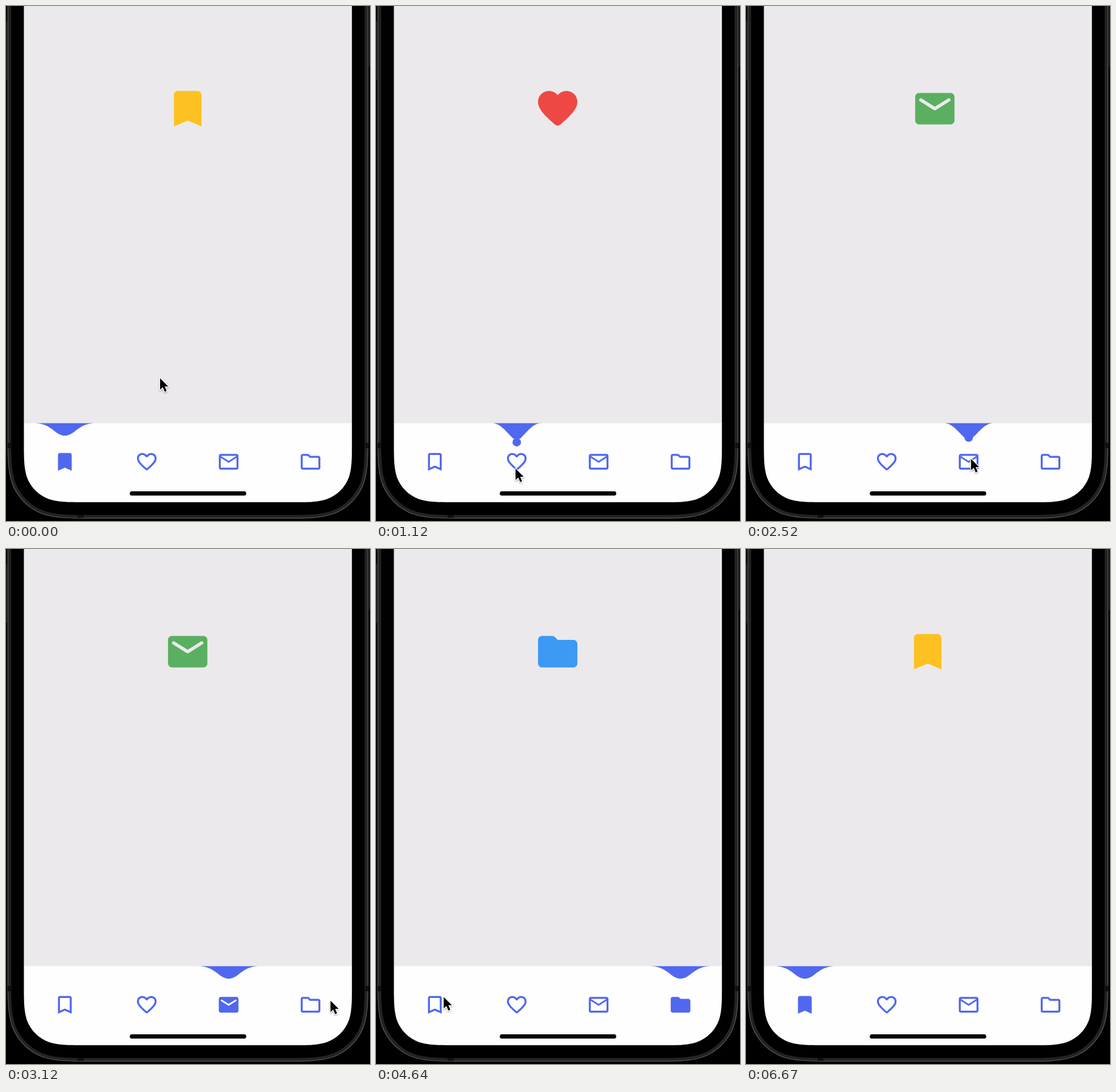
Animation, 600 px wide and 850 px high, one loop 6700 ms. Source, as an HTML page:

```html
<!DOCTYPE html>
<html lang="en">
<head>
<meta charset="utf-8">
<title>Water drop navigation bar</title>
<style>
html, body { margin: 0; width: 100%; height: 100%; overflow: hidden; background: #000; }
svg { display: block; width: 600px; height: 850px; }
</style>
</head>
<body>
<svg viewBox="0 0 600 850">
  <defs>
    <clipPath id="screen"><path id="screenShape"/></clipPath>
    <clipPath id="reveal"><circle id="revealCircle" cx="12" cy="12" r="0"/></clipPath>
    <filter id="shadow" x="-50%" y="-50%" width="200%" height="200%">
      <feDropShadow dx="0" dy="1.5" stdDeviation="1.3" flood-opacity=".4"/>
    </filter>
  </defs>

  <rect width="600" height="850"/>
  <path d="M0 25H2V122H0ZM598 0H600V100H598Z" fill="#1b1b1b"/>
  <g id="body"></g>
  <path d="M3 721H8V730H3ZM592 721H597V730H592ZM118 840H128V845H118Z" fill="#111"/>

  <g clip-path="url(#screen)">
    <rect x="29" width="542" height="689" fill="#ebe9ec"/>
    <g id="pages"></g>
    <rect x="29" y="688.5" width="542" height="131" fill="#fffeff"/>
    <g fill="#5068ef">
      <path id="wave"/>
      <circle id="drop" r="7"/>
      <g id="tabs" fill-rule="evenodd"></g>
    </g>
    <rect x="204" y="801" width="192" height="7" rx="3.5"/>
  </g>
  <path id="cursor" d="M0 0V23L5.4 18L9.4 27L13.2 25.4L9.4 16.6H16.4Z"
    stroke="#fff" stroke-width="3" stroke-linejoin="round" paint-order="stroke" filter="url(#shadow)"/>
</svg>

<script>
const LOOP = 6700, PAGE_WIDTH = 540, BAR_TOP = 688.5;

const bookmark = "M17 3H7c-1.1 0-2 .9-2 2v16l7-3 7 3V5c0-1.1-.9-2-2-2z";
const heart = "M13.35 20.13c-.76.69-1.93.69-2.69-.01l-.11-.1C5.3 15.27 1.87 12.16 2 8.28c.06-1.7.93-3.33 2.34-4.29 2.64-1.8 5.9-.96 7.66 1.1 1.76-2.06 5.02-2.91 7.66-1.1 1.41.96 2.28 2.59 2.34 4.29.14 3.88-3.3 6.99-8.55 11.76l-.1.09z";
const envelope = "M20 4H4c-1.1 0-2 .9-2 2v12c0 1.1.9 2 2 2h16c1.1 0 2-.9 2-2V6c0-1.1-.9-2-2-2z";
const folder = "M10.59 4.59C10.21 4.21 9.7 4 9.17 4H4c-1.1 0-2 .9-2 2v12c0 1.1.9 2 2 2h16c1.1 0 2-.9 2-2V8c0-1.1-.9-2-2-2h-8z";

const icons = [
  { color: "#fdc122", solid: bookmark, line: bookmark + "M17 18l-5-2.18L7 18V5h10z" },
  { color: "#ee4845", solid: heart,
    line: heart + "M12.1 18.55l-.1.1-.1-.1C7.14 14.24 4 11.39 4 8.5 4 6.5 5.5 5 7.5 5c1.54 0 3.04.99 3.57 2.36h1.87C13.46 5.99 14.96 5 16.5 5c2 0 3.5 1.5 3.5 3.5 0 2.89-3.14 5.74-7.9 10.05z" },
  { color: "#5aaf60",
    solid: envelope + "M19.6 8.25l-7.07 4.42c-.32.2-.74.2-1.06 0L4.4 8.25c-.25-.16-.4-.43-.4-.72 0-.67.73-1.07 1.3-.72L12 11l6.7-4.19c.57-.35 1.3.05 1.3.72 0 .29-.15.56-.4.72z",
    line: envelope + "M20 18H4V8l8 5 8-5zM12 11L4 6h16z" },
  { color: "#3c99f4", solid: folder, line: folder + "M4 18V6h5.17l2 2H20v10z" },
];

const taps = [
  { at: 715, from: 0, to: 1 },
  { at: 2180, from: 1, to: 2 },
  { at: 3520, from: 2, to: 3 },
  { at: 5080, from: 3, to: 0 },
];

// Pointer stops: time, x, y
const stops = [
  [0, 254, 613], [30, 254, 613], [320, 204, 715], [560, 229, 769], [715, 230, 762],
  [1480, 230, 762], [1980, 370, 744], [2150, 370, 742], [2500, 370, 746], [2980, 532, 744],
  [3160, 535, 744], [3420, 506, 746], [3520, 506, 746], [3900, 502, 762], [4220, 500, 762],
  [4640, 112, 738], [4780, 78, 742], [5000, 94, 745], [5160, 94, 745],
  [5450, 410, 738], [5580, 557, 738], [5680, 670, 738],
];

const $ = id => document.getElementById(id);
const clamp = v => Math.min(1, Math.max(0, v));
const ramp = (t, a, b) => clamp((t - a) / (b - a));
const lerp = (a, b, k) => a + (b - a) * k;
const smooth = k => k * k * (3 - 2 * k);
const tabX = i => 97 + 135 * i;
const show = (node, visible) => node.setAttribute("visibility", visible ? "visible" : "hidden");

function add(parent, attrs) {
  const path = document.createElementNS("http://www.w3.org/2000/svg", "path");
  for (const key in attrs) path.setAttribute(key, attrs[key]);
  return parent.appendChild(path);
}

// Screen outline with continuous corners, grown outwards by a margin
function outline(margin) {
  const left = 29.5 - margin, right = 570.2 + margin, bottom = 819 + margin, r = 65.6 + margin;
  const corner = [[0, 1.5287], [0, 1.0885], [0, .8684], [.0749, .6315], [.1691, .3728]];
  const curve = corner.concat(corner.map(([x, y]) => [y, x]).reverse());
  const leftSide = curve.map(([x, y]) => `${left + x * r} ${bottom - y * r}`);
  const rightSide = curve.map(([x, y]) => `${right - x * r} ${bottom - y * r}`).reverse();
  const trace = p => `${p[0]}C${p.slice(1, 4).join(" ")}C${p.slice(4, 7).join(" ")}C${p.slice(7).join(" ")}`;
  return `M${left} -5L${trace(leftSide)}L${trace(rightSide)}L${right} -5Z`;
}

$("screenShape").setAttribute("d", outline(0));
[[27, "#585858"], [25.8, "#232323"], [21, "#000"]].forEach(([margin, fill]) =>
  add($("body"), { d: outline(margin), fill }));

const place = (x, y, scale) => `translate(${x} ${y}) scale(${scale}) translate(-12 -12)`;

icons.forEach((icon, i) => {
  add($("pages"), {
    d: icon.solid, fill: icon.color, "fill-rule": "evenodd",
    transform: place(299.5 + PAGE_WIDTH * i, 169.5, 3.24),
  });
  const transform = place(tabX(i), 752.3, 1.62);
  icon.linePath = add($("tabs"), { d: icon.line, transform });
  icon.fillPath = add($("tabs"), { d: icon.solid, transform, "clip-path": "url(#reveal)" });
});

// Hermite curve through the stops; a stop next to a pause has zero speed
function pointerAt(t) {
  let i = 0;
  while (i < stops.length - 2 && stops[i + 1][0] <= t) i++;
  const a = stops[i], b = stops[i + 1], span = b[0] - a[0], k = ramp(t, a[0], b[0]);
  const slope = (n, axis) => {
    const p = stops[n - 1], c = stops[n], q = stops[n + 1];
    if (!p) return 0;
    if (!q) return (c[axis] - p[axis]) / (c[0] - p[0]);
    const before = (c[axis] - p[axis]) / (c[0] - p[0]), after = (q[axis] - c[axis]) / (q[0] - c[0]);
    return before * after <= 0 ? 0 : 2 * before * after / (before + after);
  };
  return [1, 2].map(axis => {
    const k2 = k * k, k3 = k2 * k;
    return (2 * k3 - 3 * k2 + 1) * a[axis] + (k3 - 2 * k2 + k) * span * slope(i, axis)
      + (3 * k2 - 2 * k3) * b[axis] + (k3 - k2) * span * slope(i + 1, axis);
  });
}

function wavePath(cx, stretch) {
  const mix = (rest, pulled) => lerp(rest, pulled, stretch);
  const half = mix(50, 41), c1 = mix(22, 28), c2 = mix(16, 22), tip = mix(0, 6);
  const y2 = BAR_TOP + mix(20.7, 9), depth = BAR_TOP + mix(20.7, 25.5);
  return `M${cx - half} ${BAR_TOP}C${cx - c1} ${BAR_TOP} ${cx - c2} ${y2} ${cx - tip} ${depth}`
    + `H${cx + tip}C${cx + c2} ${y2} ${cx + c1} ${BAR_TOP} ${cx + half} ${BAR_TOP}Z`;
}

function draw(t) {
  const tap = taps.filter(p => p.at <= t).pop() || { at: -LOOP, from: 0, to: 0 };
  const e = t - tap.at;

  const slide = 1 - (1 - ramp(e, 0, 400)) ** 2;
  $("pages").setAttribute("transform", `translate(${-PAGE_WIDTH * lerp(tap.from, tap.to, slide)} 0)`);

  const waveX = lerp(tabX(tap.from), tabX(tap.to), smooth(ramp(e, 0, 280)));
  const stretch = smooth(ramp(e, 245, 360)) * (1 - smooth(ramp(e, 395, 510)));
  $("wave").setAttribute("d", wavePath(waveX, stretch));

  show($("drop"), e >= 280 && e < 690);
  $("drop").setAttribute("cx", tabX(tap.to));
  $("drop").setAttribute("cy", lerp(705, 752.3, ramp(e, 280, 680)));

  $("revealCircle").setAttribute("r", 15 * ramp(e, 620, 820));
  icons.forEach((icon, i) => {
    const selected = i === tap.to;
    show(icon.fillPath, selected && e > 620);
    show(icon.linePath, !selected || e < 820);
  });

  const [x, y] = pointerAt(t);
  $("cursor").setAttribute("transform", `translate(${x} ${y + 1.5}) scale(.82)`);
}

const start = performance.now();
function tick() {
  draw((performance.now() - start) % LOOP);
  requestAnimationFrame(tick);
}
tick();
</script>
</body>
</html>
```
